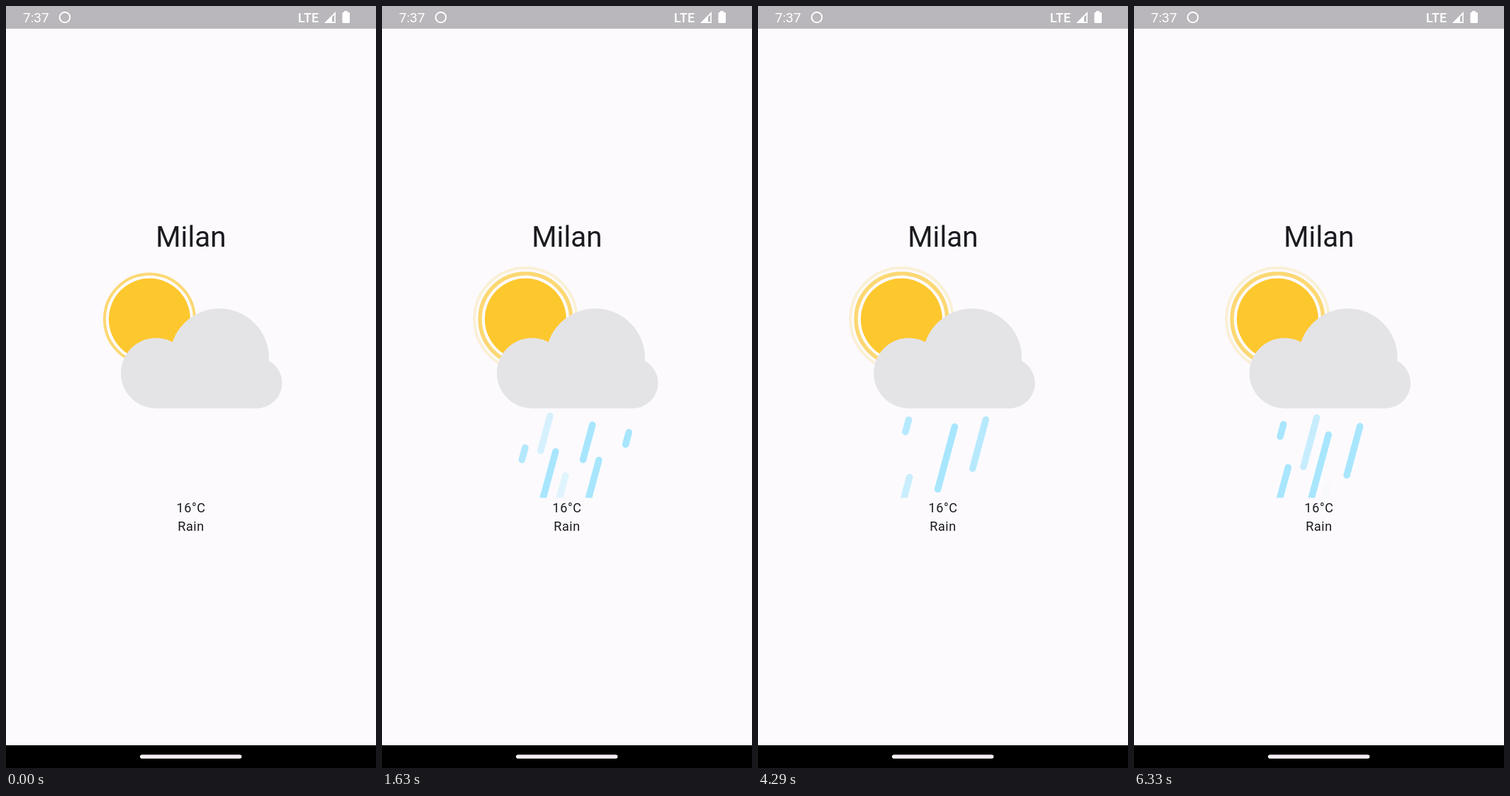
Animation of 522 by 1073 pixels, one loop 6.41 s. Source, as an HTML page:

```html
<!DOCTYPE html>
<html lang="en">
<head>
<meta charset="utf-8">
<title>Weather</title>
<style>
  html, body { margin: 0; width: 100%; height: 100%; overflow: hidden; background: #fcfafd; }
  svg { display: block; width: 522px; height: 1073px; }
  text { font-family: Roboto, sans-serif; fill: #1b1a20; text-anchor: middle; }
  .title { font-size: 40.5px; }
  .body { font-size: 18.2px; letter-spacing: .5px; }
  .status text { fill: #fff; font-size: 19px; text-anchor: start; }
  .status .net { font-size: 18px; font-weight: 500; }
</style>
</head>
<body>
<svg viewBox="0 0 522 1073">
  <defs>
    <clipPath id="scene"><rect x="100" y="360" width="330" height="332.5"/></clipPath>
  </defs>
  <rect width="522" height="1073" fill="#fcfafd"/>

  <g class="status">
    <rect width="522" height="32" fill="#b9b7bb"/>
    <text x="24" y="23">7:37</text>
    <circle cx="83" cy="16" r="7.3" fill="none" stroke="#fff" stroke-width="2"/>
    <text class="net" x="412" y="22.5">LTE</text>
    <path d="M449 24H465V8ZM460 15.5L463.3 12.2V22.3H460Z" fill="#fff" fill-rule="evenodd"/>
    <path d="M477 7h5v2h2a1 1 0 0 1 1 1v13a1 1 0 0 1-1 1h-8.5a1 1 0 0 1-1-1v-13a1 1 0 0 1 1-1h1.5z" fill="#fff"/>
  </g>

  <text class="title" x="261" y="338.5">Milan</text>

  <g clip-path="url(#scene)">
    <g transform="translate(202.5 441)">
      <circle id="halo" fill="none" stroke="#faf0d6" stroke-width="4"/>
      <circle id="ring" fill="#fdfbfa" stroke="#fcd873"/>
      <circle r="57.5" fill="#fdc72e"/>
    </g>
    <g id="rain" stroke="#a8e6fe" stroke-width="9.5" stroke-linecap="round"></g>
    <g id="cloud" fill="#e4e4e7">
      <circle cx="211.5" cy="517" r="49.5"/>
      <circle cx="301" cy="496" r="70"/>
      <circle cx="354" cy="531" r="35.5"/>
      <rect x="211" y="500" width="143" height="66.5"/>
    </g>
  </g>

  <text class="body" x="261" y="712.5">16°C</text>
  <text class="body" x="261" y="739">Rain</text>

  <rect y="1041" width="522" height="32" fill="#000"/>
  <rect x="189" y="1054.2" width="143.5" height="5.6" rx="2.8" fill="#f3eef3"/>
</svg>

<script>
const LOOP = 6410;
const SLOPE = 0.27, TOP = 571, FADE = 14;
const RESTART = 1150, HEAD_START = 560;
const $ = id => document.getElementById(id);
const clamp = v => Math.max(0, Math.min(1, v));

// Each lane drops one streak again and again; it fades out as its head nears `end`.
const lanes = [
  { x: 213.3, length: 17, first: 1214, end: 634 },
  { x: 236.3, length: 49, first: 1570, end: 672, every: 1064 },
  { x: 257.7, length: 69, first: 1308, end: 700 },
  { x: 280.8, length: 88, first: 1210, end: 666 },
  { x: 299.5, length: 49, first: 1489, end: 678, every: 1040 },
  { x: 322.0, length: 69, first: 1244, end: 700 },
  { x: 353.8, length: 17, first: 1382, end: 634 }
];

for (const lane of lanes) {
  lane.line = document.createElementNS($("rain").namespaceURI, "line");
  $("rain").append(lane.line);
}

function setAll(node, values) {
  for (const name in values) node.setAttribute(name, values[name]);
}

function drawStreak({ x, length, first, end, every = 995, line }, clock) {
  const speed = .125 + .000013 * length ** 2;
  const y = TOP + (clock - first) % every * speed;
  const left = x - (y - 580) * SLOPE;
  setAll(line, {
    x1: left, y1: y, x2: left - length * SLOPE, y2: y + length,
    opacity: clock < first ? 0 : clamp(Math.min(y - TOP, end - y) / FADE)
  });
}

function draw(t) {
  // The rain starts early and begins anew once.
  const clock = t < RESTART ? t + HEAD_START : t;
  lanes.forEach(lane => drawStreak(lane, clock));

  const grown = clamp((t - 250) / 250);
  setAll($("halo"), { r: 65 + 7.2 * grown, opacity: grown });
  setAll($("ring"), { r: 63.5 + .8 * grown, "stroke-width": 4 + 1.5 * grown });

  const sway = 1.5 * Math.sin(Math.PI * (t - 1200) / 7600) ** 4;
  $("cloud").setAttribute("transform", `translate(${sway} 0)`);
}

// Redraws come every 60 ms at first, then half as often.
function snap(t) {
  const [offset, step] = t < 2100 ? [50, 60] : [90, 120];
  return Math.max(0, offset + Math.floor((t - offset) / step) * step);
}

const begin = performance.now();
function tick() {
  draw(snap((performance.now() - begin) % LOOP));
  requestAnimationFrame(tick);
}
tick();
</script>
</body>
</html>
```
